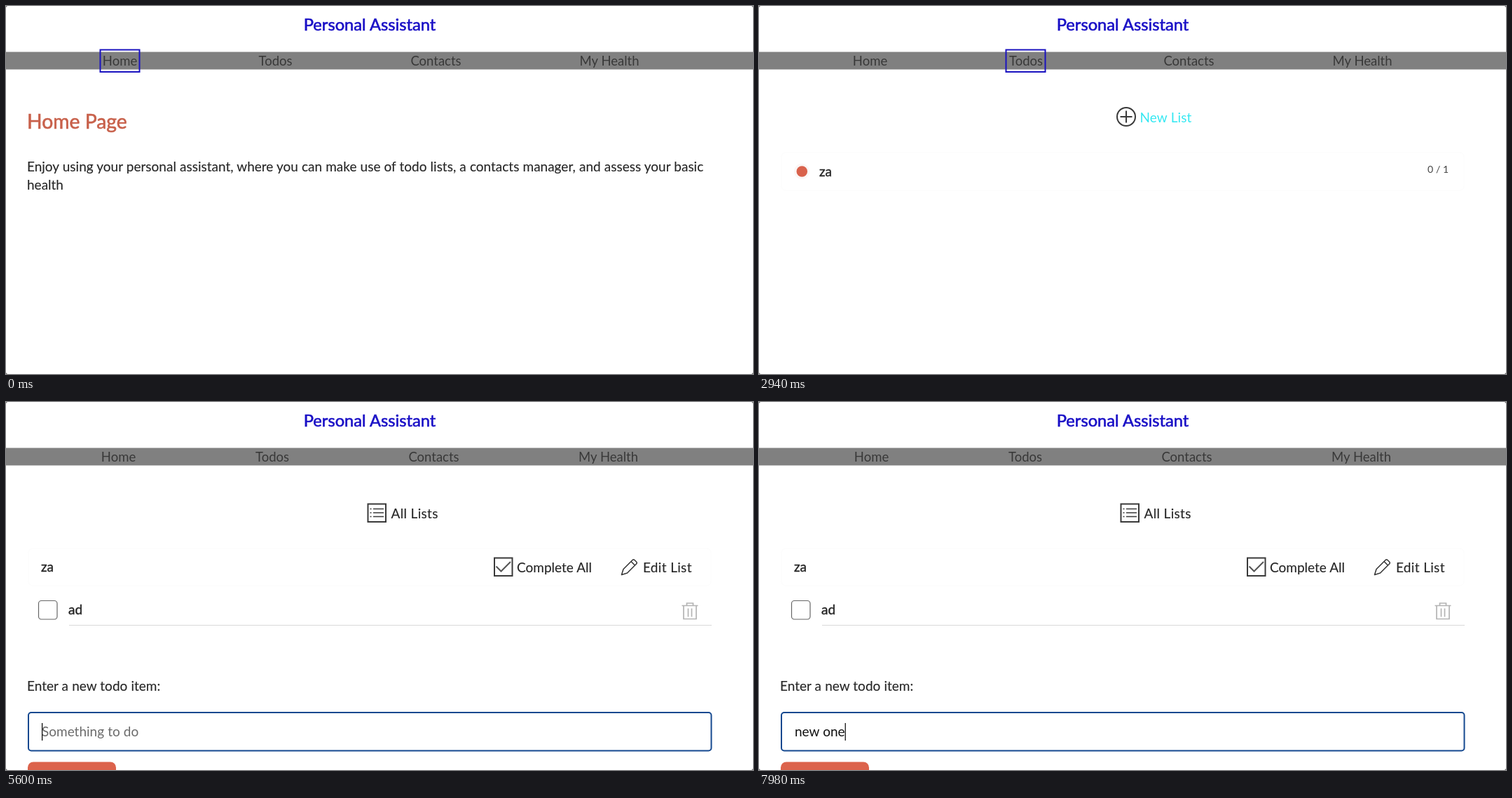
Write an HTML page that moves like this. It is 1066 by 525 pixels and loops after 8 s.

```html
<!DOCTYPE html>
<html lang="en">
<head>
<meta charset="utf-8">
<title>Personal Assistant</title>
<style>
  html, body { margin: 0; width: 100%; height: 100%; overflow: hidden; background: #fff; }
  svg { display: block; width: 100vw; height: 100vh; }
  text {
    font: 19px Lato, "Open Sans", sans-serif; word-spacing: .25px; white-space: pre;
    fill: #262626; stroke: #262626; stroke-width: .12px;
  }
  .mid { text-anchor: middle; }
  #title { font-size: 23.7px; word-spacing: 0; fill: #1a10c6; stroke: #1a10c6; stroke-width: .6px; }
  #nav text { font-size: 18.5px; fill: #383838; stroke: none; }
  .heading { font-size: 28.3px; word-spacing: 0; fill: #c8614b; stroke: #c8614b; stroke-width: .6px; }
  .strong { stroke-width: .45px; }
  .loose { letter-spacing: .3px; }
  .small { font-size: 14px; fill: #444; stroke: none; }
  #newList { letter-spacing: .1px; stroke: none; }
  #entry { stroke: none; }
  .icon { fill: none; stroke: #3a3a3a; stroke-width: 2; }
  .card { fill: #fff; stroke: #fcfcfc; }
</style>
</head>
<body>
<svg viewBox="0 0 1066 525" preserveAspectRatio="none">
  <rect width="1066" height="525" fill="#fff"/>
  <g id="view">
    <text id="title" class="mid" x="519" y="34.5">Personal Assistant</text>
    <rect y="65.5" width="1066" height="25" fill="#808080"/>
    <g id="nav">
      <text class="mid" y="85">Home</text>
      <text class="mid" y="85">Todos</text>
      <text class="mid" y="85">Contacts</text>
      <text class="mid" y="85">My Health</text>
    </g>
    <rect id="focusBox" y="62.5" width="56" height="31.5" fill="none" stroke="#1a12c0" stroke-width="2"/>

    <g id="home">
      <text class="heading" x="30" y="175">Home Page</text>
      <text x="30" y="236">Enjoy using your personal assistant, where you can make use of todo lists, a contacts manager, and assess your basic</text>
      <text x="30" y="261.5">health</text>
    </g>

    <g id="todos">
      <g class="icon">
        <circle cx="524" cy="158" r="13"/>
        <path d="M515.5 158h17M524 149.5v17"/>
      </g>
      <text id="newList" x="543.5" y="166">New List</text>
      <rect class="card" x="32" y="209" width="974" height="54" rx="6"/>
      <circle cx="61" cy="236" r="11" fill="#fbf7f6"/>
      <circle cx="61.3" cy="236" r="7.8" fill="#d9624c"/>
      <text class="strong" x="86" y="243">za</text>
      <text class="small" x="954" y="238">0 / 1</text>
    </g>

    <g id="list">
      <g class="icon">
        <rect x="516.5" y="145.5" width="25.5" height="25.5"/>
        <path d="M524 152.5h15M524 158h15M524 163.5h15M519.5 152.5h2M519.5 158h2M519.5 163.5h2" stroke-width="1.6"/>
      </g>
      <text class="loose" x="549.5" y="166">All Lists</text>
      <rect class="card" x="32" y="209" width="974" height="53" rx="6"/>
      <text class="strong" x="50" y="242">za</text>
      <g class="icon">
        <rect x="697" y="222.5" width="25.5" height="25.5"/>
        <path d="M699.5 234.5l7 7 13.5-13.5" stroke="#555"/>
        <path d="M878.5 246.5l2.5-8 13-13q1.5-1.5 3 0l2.5 2.5q1.5 1.5 0 3l-13 13zM892 227.5l5.5 5.5" stroke-width="1.6" stroke-linejoin="round"/>
      </g>
      <text x="729" y="243">Complete All</text>
      <text class="loose" x="909" y="243">Edit List</text>
      <rect x="46.5" y="283.5" width="26.5" height="26.5" rx="4" fill="#fff" stroke="#666" stroke-width="1.2"/>
      <text class="strong" x="89" y="303">ad</text>
      <path d="M90 318.5H1007" stroke="#d9d9d9"/>
      <path d="M964.5 290.5h23M971.5 290v-3h9v3M967 291v18.5h18V291M973.5 294.5v12M978.5 294.5v12" fill="none" stroke="#b4b4b4" stroke-width="1.7"/>
      <text x="30" y="412">Enter a new todo item:</text>
      <rect id="field" fill="#fff"/>
      <text id="entry" x="51" y="477"></text>
      <rect id="caret" y="458" width="1.2" height="25" fill="#000"/>
      <rect x="31" y="513.5" width="126" height="50" rx="8" fill="#dc634c"/>
    </g>
  </g>
  <path d="M0 0h2l-2 2zM1066 0h-2l2 2zM0 525h2l-2-2zM1066 525h-2l2-2z" fill="#777"/>
</svg>
<script>
  const LOOP = 8000;
  const $ = id => document.getElementById(id);
  const set = (node, attrs) => {
    for (const key in attrs) node.setAttribute(key, attrs[key]);
  };
  const show = (node, on) => node.setAttribute('display', on ? 'inline' : 'none');

  // Latest value whose start time has passed.
  const at = (steps, t) => steps.reduce((v, [start, value]) => t >= start ? value : v, null);

  const pages = [[0, 'home'], [1890, 'todos'], [3780, 'list']];
  const navCentres = {
    home: [162.5, 384.5, 613.5, 861],
    todos: [158.5, 381, 613.5, 861],
    list: [160.5, 380, 610.5, 859.5]
  };
  const focusX = { home: 134.5, todos: 352.5 };
  const scroll = [[0, 0], [7350, -1], [7560, -2], [7840, -1], [7910, 0]];
  const phrase = 'new one';
  const keyTimes = [6090, 6160, 6230, 6370, 6580, 6720, 6790];
  const focusTime = 5600;
  const carets = [[0, false], [focusTime, true], [7350, false], [7840, true]];

  const plainField = { x: 31.5, y: 442.5, width: 975.5, height: 56, rx: 7, stroke: '#a3a3a3', 'stroke-width': 1.2 };
  const activeField = { x: 32, y: 443, width: 974.5, height: 54.5, rx: 4, stroke: '#14488f', 'stroke-width': 2 };

  function drawField(t) {
    const active = t >= focusTime;
    const typed = phrase.slice(0, keyTimes.filter(k => t >= k).length);
    const entry = $('entry');
    set($('field'), active ? activeField : plainField);
    entry.textContent = typed || 'Something to do';
    entry.style.fill = typed ? '#111' : '#6b6b6b';
    set($('caret'), { x: 51 + (typed ? entry.getComputedTextLength() : 0) });
    show($('caret'), at(carets, t));
  }

  function draw(t) {
    const page = at(pages, t);
    for (const [, name] of pages) show($(name), name === page);
    [...$('nav').children].forEach((link, i) => set(link, { x: navCentres[page][i] }));
    show($('focusBox'), page in focusX);
    if (page in focusX) set($('focusBox'), { x: focusX[page] });
    $('newList').style.fill = t >= 2940 && t < 3570 ? '#35e8f2' : '#2b2b2b';
    if (page === 'list') drawField(t);
    set($('view'), { transform: `translate(0 ${at(scroll, t)})` });
  }

  const began = performance.now();
  function tick() {
    draw((performance.now() - began) % LOOP);
    requestAnimationFrame(tick);
  }
  tick();
</script>
</body>
</html>
```
